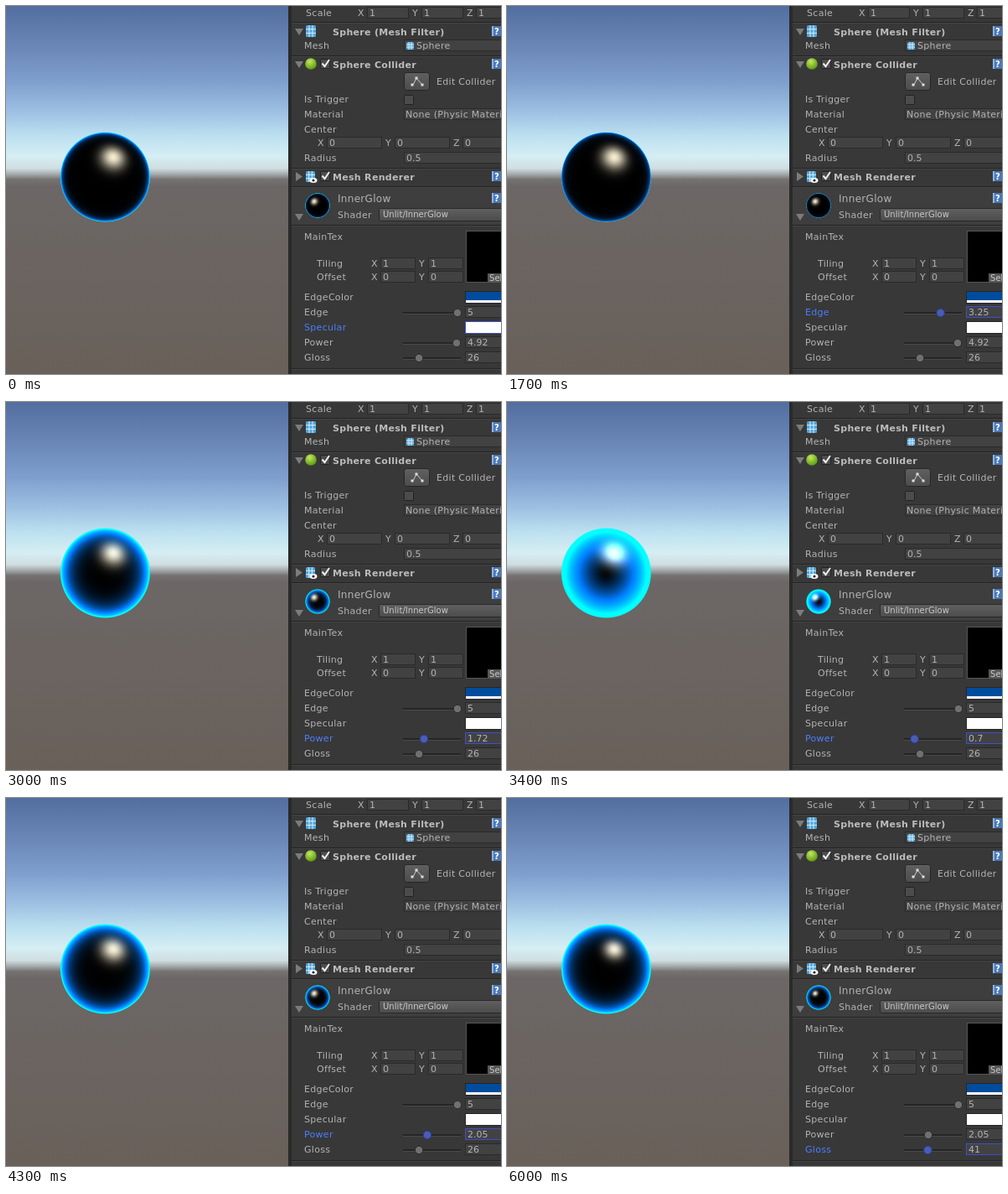
An HTML page with a canvas for the animation above (6.7 s loop, 591 px wide and 439 px high).

```html
<!DOCTYPE html>
<html lang="en">
<head>
<meta charset="utf-8">
<title>Inner glow shader</title>
<style>
  html, body { margin: 0; width: 100%; height: 100%; overflow: hidden; background: #383838; }
  #stage { position: relative; width: 591px; height: 439px; overflow: hidden; }
  svg, canvas { position: absolute; }
  svg { left: 0; top: 0; }
  text { font: 11px "DejaVu Sans", Verdana, sans-serif; letter-spacing: .3px; fill: #b4b4b4; white-space: pre; }
  .bold { font-weight: bold; fill: #bdbdbd; }
  .title { font-size: 12px; }
  .small { font-size: 10px; letter-spacing: .05px; fill: #c8c8c8; }
  .num { letter-spacing: 0; }
  .field { fill: #424242; stroke: #2a2a2a; }
  .track { fill: #252525; }
  .thumb { fill: #707070; stroke: #2c2c2c; }
  .fold { fill: #7c7c7c; }
  .on text.label { fill: #4c7eff; }
  .on .field, .on .swatch { stroke: #3d50c8; }
  .on .thumb { fill: #4a5cb4; stroke: #2c3f9c; }
</style>
</head>
<body>
<div id="stage">
  <svg id="ui" width="591" height="439" viewBox="0 0 591 439"></svg>
  <canvas id="ball" width="112" height="112" style="left:62px;top:148px"></canvas>
  <canvas id="mini" width="32" height="32" style="left:356px;top:222px"></canvas>
</div>
<script>
const LOOP = 6700, STEP = 100;
const START = { edge: 5, power: 4.92, gloss: 26, focus: 'specular' };

// Slider drags: property, start time, number of steps, first and last value
const DRAGS = [
  ['edge', 700, 7, 4.38, 0.65],
  ['edge', 1500, 5, 1.5, 5],
  ['power', 2600, 7, 4.76, 0.2],
  ['power', 3400, 5, 0.7, 2.95],
  ['power', 4000, 4, 2.71, 2.05],
  ['gloss', 4800, 6, 30, 80],
  ['gloss', 5600, 3, 64, 41]
];

const rect = (x, y, w, h, fill, extra = '') =>
  `<rect x="${x}" y="${y}" width="${w}" height="${h}" fill="${fill}" ${extra}/>`;
const text = (x, y, s, cls = '') => `<text x="${x}" y="${y}" class="${cls}">${s}</text>`;
const path = (d, fill, extra = '') => `<path d="${d}" fill="${fill}" ${extra}/>`;
const field = (x, y, w, h = 13) =>
  `<rect class="field" x="${x + .5}" y="${y + .5}" width="${w}" height="${h}"/>`;
const line = y => rect(341, y, 250, 1, '#232323') + rect(341, y + 1, 250, 1, '#454545');
const foldDown = y => `<path class="fold" d="M345 ${y}h10l-5 8z"/>`;
const help = y => rect(580, y, 14, 12, '#4a78b8', 'rx="1"') + rect(580, y, 2, 12, '#8fb4e0') +
  `<text x="583" y="${y + 10}" style="font-weight:bold;font-size:10px;fill:#fff">?</text>`;
const grid = (x, y, w, h) => rect(x, y, w, h, '#4fa3d8', 'rx="1.5"') +
  path(`M${x + w / 3} ${y}v${h}M${x + 2 * w / 3} ${y}v${h}M${x} ${y + h / 3}h${w}M${x} ${y + 2 * h / 3}h${w}`,
    'none', 'stroke="#d8eefa"');
const check = (x, y, on) => rect(x + .5, y + .5, 11, 11, '#4c4c4c', 'stroke="#222" rx="1"') +
  (on ? path(`M${x + 2.5} ${y + 5.5}l3 3.5l5.5-8`, 'none', 'stroke="#eee" stroke-width="2"') : '');

function vector(names, x, pitch, y, value, gap = 12) {
  return [...names].map((n, i) => {
    const left = x + i * pitch;
    return text(left, y, n) + field(left + gap - 1, y - 11, pitch - 16) + text(left + gap + 2, y, value, 'num');
  }).join('');
}

function slider(id, label, y) {
  return `<g id="${id}">` + text(356, y, label, 'label') +
    `<rect class="track" x="474" y="${y - 4}" width="69" height="2"/>` +
    rect(474, y - 2, 69, 1, '#4a4a4a') +
    `<circle class="thumb" cy="${y - 3}" r="4.7"/>` + field(548, y - 11, 60) +
    `<text class="num value" x="551" y="${y}"></text></g>`;
}

function scene() {
  const sky = [[0, '#526e9f'], [50, '#6a87b8'], [90, '#7e9fcd'], [125, '#9cbfe2'], [155, '#bce0f0'],
    [180, '#d6eef3'], [194, '#cfdde0'], [201, '#a2a7a9'], [207, '#757271'], [215, '#6c6766'], [439, '#696059']];
  return '<defs><linearGradient id="sky" gradientUnits="userSpaceOnUse" x1="0" y1="0" x2="0" y2="439">' +
    sky.map(([y, c]) => `<stop offset="${y / 439}" stop-color="${c}"/>`).join('') +
    '</linearGradient><radialGradient id="leaf" cx=".4" cy=".3" r=".7">' +
    '<stop offset="0" stop-color="#c4e860"/><stop offset="1" stop-color="#5c9a10"/></radialGradient>' +
    '<linearGradient id="btn" x2="0" y2="1"><stop offset="0" stop-color="#606060"/>' +
    '<stop offset="1" stop-color="#4c4c4c"/></linearGradient></defs>' +
    rect(0, 0, 337, 439, 'url(#sky)') + rect(337, 0, 4, 439, '#2a2a2a') + rect(341, 0, 250, 439, '#383838');
}

function components() {
  return text(358, 12, 'Scale') + vector('XYZ', 420, 65, 12, 1) +
    line(19) + foldDown(27) + grid(358, 23, 12, 14) + text(390, 35, 'Sphere (Mesh Filter)', 'bold') + help(24) +
    text(356, 51, 'Mesh') + field(475, 40, 130) + grid(478, 43, 9, 9) + text(490, 51, 'Sphere') +
    line(59) + foldDown(66) + '<circle cx="364" cy="69" r="6.8" fill="url(#leaf)"/>' + check(375, 63, true) +
    text(390, 74, 'Sphere Collider', 'bold') + help(63) +
    rect(475.5, 79.5, 30, 21, 'url(#btn)', 'stroke="#262626" rx="3"') +
    path('M486 94l4-8l7 8', 'none', 'stroke="#ccc"') +
    [[485, 94], [490, 86], [497, 94]].map(([x, y]) => rect(x - 1.5, y - 1.5, 3, 3, '#ddd')).join('') +
    text(514, 94, 'Edit Collider') +
    text(356, 115, 'Is Trigger') + check(475, 106, false) +
    text(356, 133, 'Material') + field(475, 122, 130) + text(477, 133, 'None (Physic Material)') +
    text(356, 151, 'Center') + vector('XYZ', 372, 81, 167, 0) +
    text(356, 185, 'Radius') + field(475, 174, 130) + text(478, 185, '0.5', 'num') +
    line(193) + '<path class="fold" d="M346 198v11l8-5.500z"/>' + grid(358, 197, 11, 13) +
    '<ellipse cx="367" cy="208" rx="4.500" ry="3" fill="#fff"/><circle cx="367" cy="208" r="1.600" fill="#222"/>' +
    check(375, 197, true) + text(390, 208, 'Mesh Renderer', 'bold') + help(197);
}

function material() {
  return rect(341, 216, 250, 45, '#3e3e3e') + line(215) + foldDown(248) +
    text(396, 234, 'InnerGlow', 'title') + help(223) + text(396, 253, 'Shader') +
    rect(445.5, 241.5, 160, 15, 'url(#btn)', 'stroke="#282828" rx="2"') + text(450, 252, 'Unlit/InnerGlow', 'small') +
    line(261) + text(356, 279, 'MainTex') +
    rect(549.5, 268.5, 60, 61, '#000', 'stroke="#555"') + rect(575, 319, 40, 10, '#565656') +
    text(577, 328, 'Select', 'small') +
    text(371, 311, 'Tiling') + vector('XY', 436, 57, 311, 1) +
    text(371, 327, 'Offset') + vector('XY', 436, 57, 327, 0) +
    text(356, 351, 'EdgeColor') + rect(548.5, 340.5, 60, 14, '#004c9c', 'stroke="#262626"') + rect(549, 351, 60, 3, '#fff') +
    slider('edge', 'Edge', 369) +
    `<g id="specular">${text(356, 387, 'Specular', 'label')}` +
    '<rect class="swatch" x="548.5" y="376.5" width="60" height="14" fill="#fff" stroke="#262626"/></g>' +
    slider('power', 'Power', 405) + slider('gloss', 'Gloss', 423) + line(432);
}

const $ = id => document.getElementById(id);
$('ui').innerHTML = scene() + components() + material();

// Rim glow plus specular highlight on a black sphere
function shade(id, cx, cy, r, hx, hy, s) {
  const cv = $(id), ctx = cv.getContext('2d'), w = cv.width;
  const img = ctx.createImageData(w, w), hz = Math.sqrt(1 - hx * hx - hy * hy);
  for (let y = 0, i = 0; y < w; y++) {
    for (let x = 0; x < w; x++, i += 4) {
      const dx = (x + .5 - cx) / r, dy = (y + .5 - cy) / r, d = Math.hypot(dx, dy);
      const cover = Math.min(1, Math.max(0, (1 - d) * r + .5));
      if (!cover) continue;
      const nz = Math.sqrt(Math.max(0, 1 - d * d));
      const rim = s.edge * Math.pow(1 - nz, s.power);
      const spec = .96 * Math.pow(Math.max(0, dx * hx + dy * hy + nz * hz), s.gloss);
      img.data[i] = 255 * spec;
      img.data[i + 1] = 75 * rim + 244 * spec;
      img.data[i + 2] = 155 * rim + 214 * spec;
      img.data[i + 3] = 255 * cover;
    }
  }
  ctx.putImageData(img, 0, 0);
}

function stateAt(t) {
  const s = { ...START };
  for (const [key, t0, n, a, b] of DRAGS) {
    if (t < t0) break;
    const k = Math.min(n - 1, Math.floor((t - t0) / STEP));
    s[key] = a + (b - a) * k / (n - 1);
    s.focus = key;
  }
  s.gloss = Math.round(s.gloss);
  return s;
}

function setSlider(id, x, value) {
  const g = $(id);
  g.querySelector('.thumb').setAttribute('cx', x);
  g.querySelector('.value').textContent = value;
}

let shown = '';
function draw(now) {
  const s = stateAt(now % LOOP), key = JSON.stringify(s);
  if (key !== shown) {
    shown = key;
    for (const id of ['edge', 'specular', 'power', 'gloss']) $(id).classList.toggle('on', id === s.focus);
    for (const id of ['edge', 'power']) setSlider(id, 478 + 12.2 * s[id], +s[id].toFixed(2));
    setSlider('gloss', 477 + .62 * s.gloss, s.gloss);
    shade('ball', 56.4, 56, 53.4, .18, -.44, s);
    shade('mini', 16, 16, 14.6, -.28, -.34, s);
  }
}

const begin = performance.now();
function tick() {
  draw(performance.now() - begin);
  requestAnimationFrame(tick);
}
tick();
</script>
</body>
</html>
```
